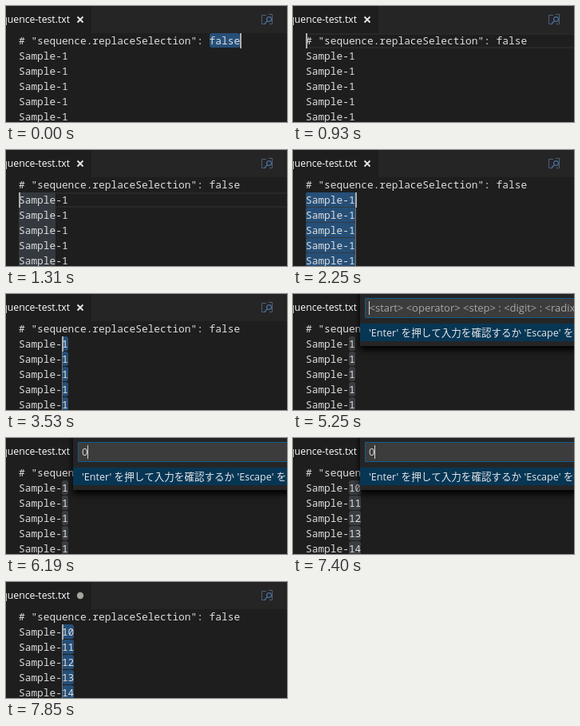
Write an HTML page with a canvas that moves like this. It is 352 px wide and 145 px high and loops after 8000 ms.

```html
<!DOCTYPE html>
<html lang="en">
<head>
<meta charset="utf-8">
<title>Insert sequence</title>
<style>
  html, body { margin: 0; width: 100%; height: 100%; overflow: hidden; background: #1e1e1e; }
  canvas { display: block; width: 352px; height: 145px; }
</style>
</head>
<body>
<canvas id="stage"></canvas>
<script>
const W = 352, H = 145, LOOP = 8000;
const LEFT = 16, TOP = 34, LINE = 19, CHAR = 7.697, ROWS = [1, 2, 3, 4, 5];
const MONO = "12.83px 'Noto Sans Mono', 'DejaVu Sans Mono', monospace";
const ui = size => `${size}px 'Open Sans', 'Noto Sans CJK JP', 'Noto Sans CJK', sans-serif`;

const canvas = document.getElementById('stage');
const ctx = canvas.getContext('2d');
const dpr = window.devicePixelRatio || 1;
canvas.width = W * dpr;
canvas.height = H * dpr;

// Each step overrides part of the editor state from its time on.
const steps = [
  [0, { row: 0, col: 36, sel: [31, 36], mark: null, many: false, caret: true,
        palette: false, input: '', inputCaret: true, numbered: false, dirty: false }],
  [220, { caret: false }],
  [700, { caret: true, sel: null }],
  [930, { col: 0 }],
  [1010, { row: 1 }],
  [1310, { mark: [0, 6] }],
  [1480, { sel: [0, 8], col: 8, mark: [0, 8] }],
  [2030, { caret: false }],
  [2250, { caret: true, many: true }],
  [2820, { sel: null }],
  [2890, { mark: null }],
  [3190, { mark: [7, 8] }],
  [3530, { sel: [7, 8], col: 7, mark: null }],
  [3910, { caret: false }],
  [4380, { caret: true }],
  [4850, { caret: false }],
  [5250, { palette: true }],
  [5820, { inputCaret: false }],
  [6190, { inputCaret: true, input: '0' }],
  [6360, { sel: [7, 9], numbered: true }],
  [6830, { inputCaret: false }],
  [7400, { inputCaret: true }],
  [7850, { palette: false, caret: true, dirty: true }]
];

const stateAt = t => Object.assign({}, ...steps.filter(s => s[0] <= t).map(s => s[1]));
const colX = col => Math.round(LEFT + col * CHAR);
const rowY = row => TOP + row * LINE;

function rect(x, y, w, h, color) {
  ctx.fillStyle = color;
  ctx.fillRect(x, y, w, h);
}

function text(str, x, y, font, color, align = 'left') {
  ctx.font = font;
  ctx.fillStyle = color;
  ctx.textAlign = align;
  ctx.fillText(str, x, y);
}

function line(color, width, ...paths) {
  ctx.strokeStyle = color;
  ctx.lineWidth = width;
  ctx.beginPath();
  for (const [first, ...rest] of paths) {
    ctx.moveTo(...first);
    rest.forEach(p => ctx.lineTo(...p));
  }
  ctx.stroke();
}

function span(row, [from, to], color, height = LINE, radius = 0) {
  const x = colX(from);
  ctx.fillStyle = color;
  ctx.beginPath();
  ctx.roundRect(x, rowY(row), colX(to) - x, height, radius);
  ctx.fill();
}

function drawTabs(dirty) {
  rect(0, 0, W, TOP, '#252526');
  rect(0, 0, 107, TOP, '#1e1e1e');
  text('sequence-test.txt', 80, 21, ui(12.25), '#ffffff', 'right');

  if (dirty) {
    ctx.fillStyle = '#a5a59d';
    ctx.beginPath();
    ctx.arc(93, 17, 4.2, 0, 7);
    ctx.fill();
  } else {
    line('#e8e8e8', 1.8, [[89.5, 13.5], [96.5, 20.5]], [[96.5, 13.5], [89.5, 20.5]]);
  }
  drawPreviewIcon();
}

function drawPreviewIcon() {
  line('#4f5f6e', 1,
    [[324, 22.5], [320.5, 22.5], [320.5, 11.5], [326, 11.5]],
    [[329, 10.5], [333.5, 10.5], [333.5, 22.5], [330, 22.5]]);
  line('#44709c', 1.4, [[327.5, 18.5], [323.5, 23]]);
  ctx.lineWidth = 1.2;
  ctx.beginPath();
  ctx.arc(329.5, 16.5, 2.9, 0, 7);
  ctx.stroke();
}

function drawEditor(s) {
  const active = s.many ? ROWS : [s.row];
  if (!s.sel) {
    ctx.strokeStyle = '#282828';
    ctx.lineWidth = 2;
    ctx.strokeRect(LEFT + 1, rowY(s.row) + 1, W, LINE - 2);
  }
  if (s.mark) ROWS.forEach(r => span(r, s.mark, '#33393f'));
  if (s.sel) {
    const color = s.palette ? '#3a3d41' : '#264f78';
    active.forEach(r => span(r, s.sel, color, LINE - 1, 3));
  }

  text('# "sequence.replaceSelection": false', LEFT, rowY(0) + 14, MONO, '#dedede');
  ROWS.forEach((r, i) =>
    text('Sample-1' + (s.numbered ? i : ''), LEFT, rowY(r) + 14, MONO, '#dedede'));

  if (s.caret) active.forEach(r => {
    const main = r === s.row;
    rect(colX(s.col), rowY(r), main ? 2 : 1, LINE, main ? '#aeafad' : '#747573');
  });
}

function drawPalette(s) {
  ctx.save();
  ctx.shadowColor = '#000';
  ctx.shadowBlur = 8 * dpr;
  ctx.shadowOffsetY = 5 * dpr;
  rect(84, -10, 600, 75, '#252526');
  ctx.restore();

  rect(90, 5, W, 25, '#3c3c3c');
  ctx.strokeStyle = 'rgba(14, 99, 156, 0.8)';
  ctx.lineWidth = 1;
  ctx.strokeRect(90.5, 5.5, W, 24);
  if (s.input) text(s.input, 95, 22, ui(13), '#d4d4d4');
  else text('<start> <operator> <step> : <digit> : <radix>', 95.5, 22, ui(13), '#a6a6a6');
  if (s.inputCaret) rect(s.input ? 102 : 95, 9, 1, 17, '#d4d4d4');

  rect(84, 37, W, 22, '#073655');
  text("'Enter' を押して入力を確認するか 'Escape' を押して取り消します", 95, 53, ui(12.55), '#e4e6e8');
}

function frame(now) {
  const s = stateAt(now % LOOP);
  ctx.setTransform(dpr, 0, 0, dpr, 0, 0);
  rect(0, 0, W, H, '#1e1e1e');
  drawTabs(s.dirty);
  drawEditor({ ...s, caret: s.caret && !s.palette });
  if (s.palette) drawPalette(s);
}

const start = performance.now();
(function tick() {
  frame(performance.now() - start);
  requestAnimationFrame(tick);
})();
</script>
</body>
</html>
```
